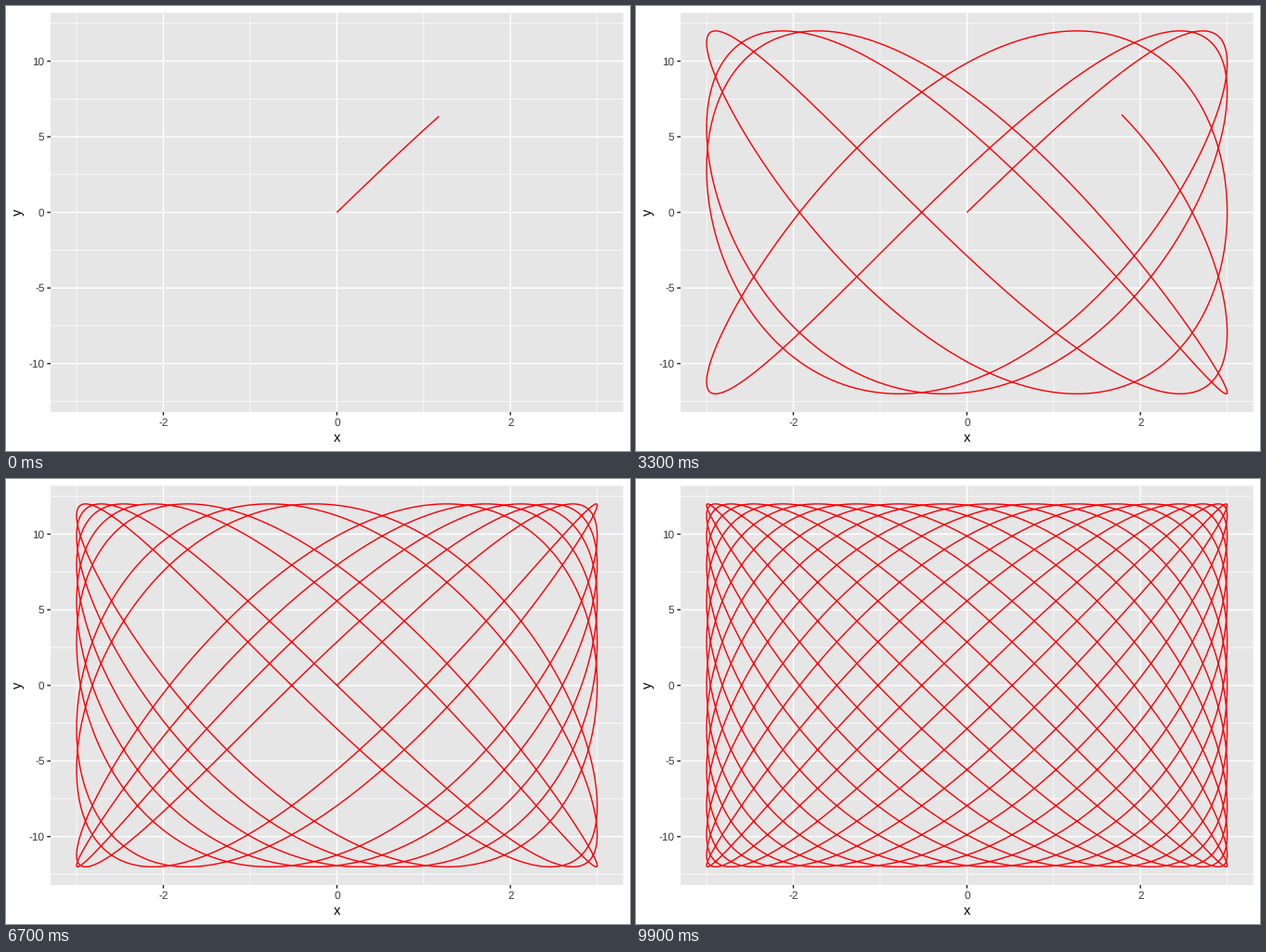
A matplotlib script for the animation above (10 s loop, 672 px wide and 480 px high).

```python
import numpy as np
import matplotlib.pyplot as plt
from matplotlib.animation import FuncAnimation
from matplotlib.patches import Rectangle

plt.rcParams.update({
    "font.family": "Liberation Sans",
    "text.hinting": "none",
    "path.simplify": False,
})

W, H, DPI = 672, 480, 96
FRAMES, INTERVAL = 100, 100
LEFT, RIGHT, TOP, BOTTOM = 48.0, 664.7, 7.3, 437.9
X_MAX, Y_MAX = 3.3, 13.2
PANEL, RED = "#E6E6E6", "#FB0007"
TICK, LABEL = "#262626", "#3C3C3C"
THICK, THIN = 1.42, 0.71


def px(x):
    return (LEFT + RIGHT) / 2 + x * (RIGHT - LEFT) / (2 * X_MAX)


def py(y):
    return (TOP + BOTTOM) / 2 - y * (BOTTOM - TOP) / (2 * Y_MAX)


fig = plt.figure(figsize=(W / DPI, H / DPI), dpi=DPI, facecolor="white")
ax = fig.add_axes([0, 0, 1, 1])
ax.set_xlim(0, W)
ax.set_ylim(H, 0)
ax.axis("off")


def stroke(xs, ys, color, width, z):
    return ax.plot(xs, ys, color=color, lw=width * 72 / DPI, zorder=z, snap=False,
                   solid_capstyle="butt", solid_joinstyle="round")[0]


def label(x, y, text, size, color, **kw):
    ax.text(x, y, text, fontsize=size, color=color, va="baseline", **kw)


def vline(x, width, z):
    stroke([px(x)] * 2, [TOP, BOTTOM], "white", width, z)


def hline(y, width, z):
    stroke([LEFT, RIGHT], [py(y)] * 2, "white", width, z)


ax.add_patch(Rectangle((LEFT, TOP), RIGHT - LEFT, BOTTOM - TOP,
                       fc=PANEL, lw=0, zorder=0, snap=False))

for x in (-3, -1, 1, 3):
    vline(x, THIN, 1)
for y in np.arange(-12.5, 13, 5):
    hline(y, THIN, 1)

for x in (-2, 0, 2):
    vline(x, THICK, 2)
    stroke([px(x)] * 2, [BOTTOM, BOTTOM + 3.65], TICK, THICK, 4)
    label(px(x), 453, str(x), 8.8, LABEL, ha="center")
for y in range(-10, 11, 5):
    hline(y, THICK, 2)
    stroke([LEFT - 3.65, LEFT], [py(y)] * 2, TICK, THICK, 4)
    label(LEFT - 6.5, py(y) + 4.2, str(y), 8.8, LABEL, ha="right")

label(px(0), 469.7, "x", 11, "black", ha="center")
ax.text(17.7, py(0), "y", fontsize=11, color="black", rotation=90,
        rotation_mode="anchor", ha="center", va="baseline")

# Lissajous curve with frequencies 13:18, revealed at constant pace
t = np.arange(0, 2 * np.pi, 0.001)
curve_x = px(3 * np.sin(13 * t))
curve_y = py(12 * np.sin(18 * t))
curve = stroke([], [], RED, THICK, 3)


def draw(i):
    last = int((i + 0.5) * (len(t) - 1) / (FRAMES - 1))
    curve.set_data(curve_x[:last + 1], curve_y[:last + 1])
    return [curve]


anim = FuncAnimation(fig, draw, frames=FRAMES, interval=INTERVAL,
                     repeat=True, repeat_delay=0, blit=False)
plt.show()
```
